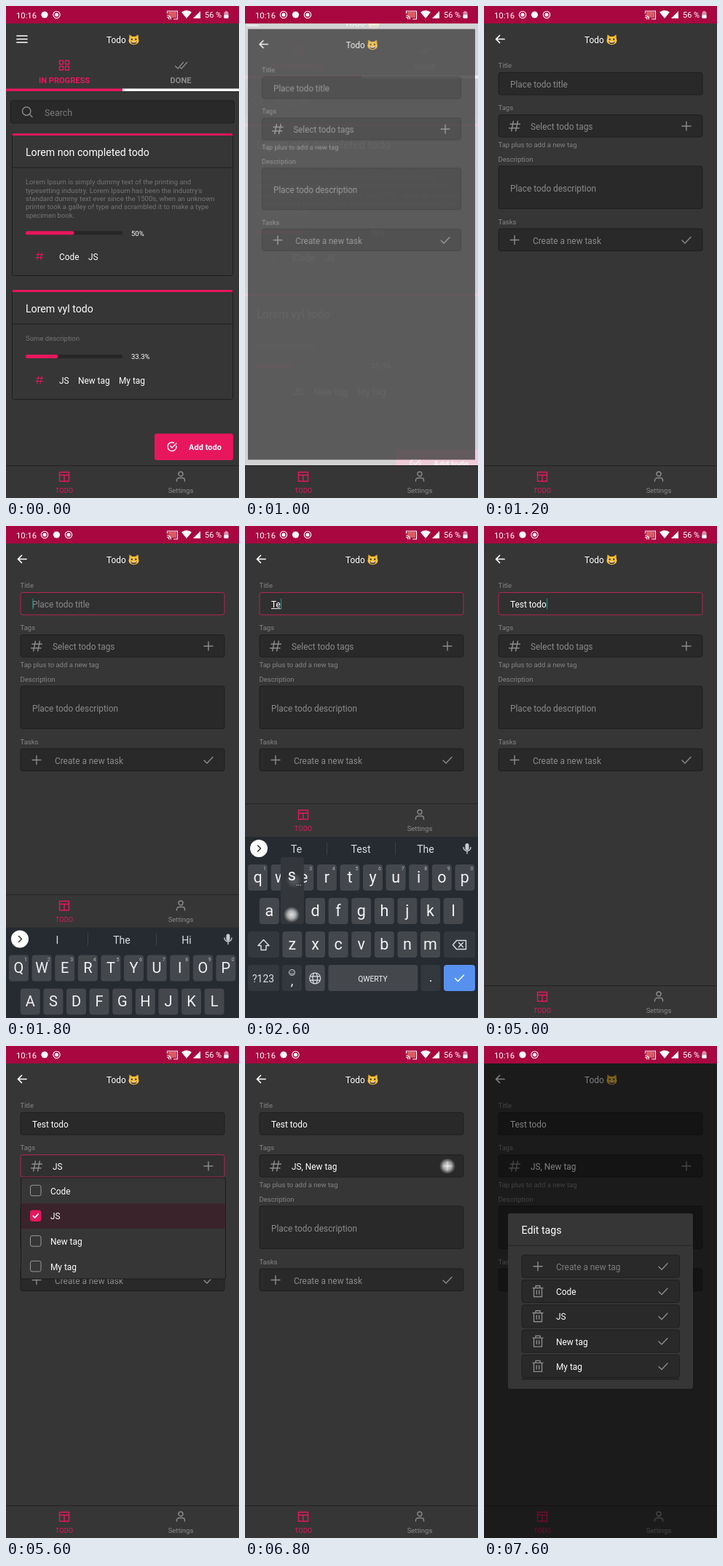
Recreate the animation shown at these times as an HTML page with a canvas. Size 320 by 676 pixels, loop 8 s.

```html
<!DOCTYPE html>
<html lang="en">
<head>
<meta charset="utf-8">
<title>Todo app</title>
<style>
html, body { margin: 0; width: 100%; height: 100%; overflow: hidden; background: #363636; }
canvas { display: block; width: 320px; height: 676px; }
</style>
</head>
<body>
<canvas id="stage"></canvas>
<script>
const W = 320, H = 676, TOP = 24, NAV = 631;
const LOOP = 8000, STEP = 200;
const BG = '#363636', FIELD = '#292929', EDGE = '#1e1e1e', PINK = '#e8175d';
const GREY = '#8b8b8b', DIM = '#757575', WHITE = '#fff';
const KEY = '#44484d', DARK_KEY = '#33383e';
const SMALL = 9.5, BODY = 11.85, LARGE = 14.15;

const ICON = {
  menu: 'M-7-4.5H7M-7 0H7M-7 4.5H7',
  grid: 'M-6.5-6.5h5v5h-5zM1.5-6.5h5v5h-5zM-6.5 1.5h5v5h-5zM1.5 1.5h5v5h-5z',
  checks: 'M-7.5 1l3.5 3.5L3.5-4M-.5 3l1.5 1.5L8.5-4',
  search: 'M-6.5-1a5.7 5.7 0 1 0 11.4 0a5.7 5.7 0 1 0-11.4 0M3.4 3.2l3.6 3.8',
  hash: 'M-1.2-5l-2 10M3.2-5l-2 10M-4.5-2h10M-5.5 2h10',
  done: 'M6-1v1a6 6 0 1 1-3.5-5.5M-2.2-.8l2.2 2.2L6-4.5',
  layout: 'M-6.5-6h13v12.5h-13zM-6.5-2h13M0-2v8.5',
  user: 'M-3-3.5a3 3 0 1 0 6 0a3 3 0 1 0-6 0M-5.5 6.5v-1.5a3 3 0 0 1 3-3h5a3 3 0 0 1 3 3v1.5',
  back: 'M6 0H-5.5M-.5-5l-5 5 5 5',
  plus: 'M-6 0H6M0-6V6',
  check: 'M-6 .5l4 4L6-4',
  trash: 'M-7-4.5h14M-3-4.5v-3h6v3M-5.5-4.5v12h11v-12M-1.7-1v5M1.7-1v5',
  shift: 'M0-7l7.5 8h-4v6h-7v-6h-4z',
  erase: 'M-9 0l5-6h13v12h-13zM-1-3l6 6M5-3l-6 6',
  globe: 'M-7.5 0a7.5 7.5 0 1 0 15 0a7.5 7.5 0 1 0-15 0M-3.3 0a3.3 7.5 0 1 0 6.6 0a3.3 7.5 0 1 0-6.6 0M-7-2.6h14M-7 2.6h14',
  smile: 'M-4 0a4 4 0 1 0 8 0a4 4 0 1 0-8 0M-2 1a2.2 2.2 0 0 0 4 0M-1.4-1.2v.1M1.4-1.2v.1',
  mic: 'M-5-1a5 5 0 0 0 10 0M0 4v3.5',
  next: 'M-2-4l4 4-4 4',
  cast: 'M-7-2.5v-3h14v11h-5M-7 .5a5 5 0 0 1 5 5M-7 3a2.5 2.5 0 0 1 2.5 2.5'
};

const TAGS = ['Code', 'JS', 'New tag', 'My tag'];
const ABOUT = [
  'Lorem Ipsum is simply dummy text of the printing and',
  "typesetting industry. Lorem Ipsum has been the industry's",
  'standard dummy text ever since the 1500s, when an unknown',
  'printer took a galley of type and scrambled it to make a type',
  'specimen book.'
];

// Timelines: [first step, value]
const TYPED = [[0, ''], [12, 'T'], [13, 'Te'], [14, 'Tes'], [15, 'Test'], [16, 'Test '],
  [18, 'Test t'], [19, 'Test to'], [20, 'Test tod'], [21, 'Test todo']];
const HINTS = [[0, 'I The Hi'], [12, 'T The To'], [13, 'Te Test The'], [14, 'Tes Test Tests'],
  [15, 'Test Testing Tests'], [16, 'the of and'], [18, 'to the today'],
  [19, 'to tomorrow today'], [20, 'tod today todo'], [21, 'todo today todos']];
const CHOSEN = [[0, ''], [28, 'JS'], [30, 'JS, New tag']];
const OPEN = [[0, 0], [4, .45], [5, .833], [6, 1]];
const BOARD = [[0, 0], [9, .5], [10, 1], [24, .4], [25, 0]];
const MODAL = [[0, 0], [36, .3], [37, .8], [38, 1]];

// Touches: [step, x, y, strength]
const TOUCHES = [
  [2, 262, 606, 1], [3, 262, 606, .6], [7, 150, 107, 1], [8, 150, 107, .25],
  [11, 144, 488, 1], [12, 80, 486, 1], [13, 64, 534, 1], [13, 67, 487, .2],
  [14, 144, 486, 1], [14, 64, 534, .2], [15, 176, 614, .9],
  [18, 264, 486, 1], [18, 144, 486, .2], [19, 97, 532, 1], [19, 264, 486, .25],
  [20, 270, 486, 1], [20, 97, 532, .25], [21, 270, 486, .25],
  [26, 160, 165, 1], [27, 110, 234, 1], [29, 110, 268, 1],
  [32, 160, 480, 1], [34, 278, 165, 1], [35, 278, 165, .3]
];

const ratio = window.devicePixelRatio || 1;
function makeContext(canvas) {
  canvas.width = W * ratio;
  canvas.height = H * ratio;
  const ctx = canvas.getContext('2d');
  ctx.scale(ratio, ratio);
  return ctx;
}
const main = makeContext(document.getElementById('stage'));
const layer = makeContext(document.createElement('canvas'));
let c = main;

const at = (list, step) => list.filter(e => e[0] <= step).pop()[1];

function box(x, y, w, h, r, fill, edge) {
  c.beginPath();
  c.roundRect(x, y, w, h, r);
  if (fill) { c.fillStyle = fill; c.fill(); }
  if (edge) { c.strokeStyle = edge; c.lineWidth = 1; c.stroke(); }
}

function disc(x, y, r, fill) {
  c.fillStyle = fill;
  c.beginPath();
  c.arc(x, y, r, 0, 7);
  c.fill();
}

// y is the middle of the capitals
function text(s, x, y, size, color = WHITE, align = 'left', weight = 400) {
  c.font = `${weight} ${size}px Roboto, sans-serif`;
  c.textAlign = align;
  c.fillStyle = color;
  c.fillText(s, x, y + size * .356);
}

function icon(name, x, y, color, size = 1, width = 1.4) {
  c.save();
  c.translate(x, y);
  c.scale(size, size);
  c.lineWidth = width / size;
  c.lineCap = c.lineJoin = 'round';
  c.strokeStyle = color;
  c.stroke(new Path2D(ICON[name]));
  c.restore();
}

function shape(d, x, y, color) {
  c.save();
  c.translate(x, y);
  c.fillStyle = color;
  c.fill(new Path2D(d));
  c.restore();
}

function cat(x, y) {
  shape('M-6.5 0L-6-7.2L-2-4.6H2L6-7.2L6.5 0z', x, y, '#f5b52a');
  shape('M-7 1a7 5.8 0 1 0 14 0a7 5.8 0 1 0-14 0', x, y, '#fcc436');
  shape('M-4 2.2h8a4 3.6 0 0 1-8 0z', x, y, '#5a3a35');
  shape('M-2.8 2.4h5.6v1.2h-5.6z', x, y, WHITE);
  disc(x - 2.8, y - .8, 1.2, '#443026');
  disc(x + 2.8, y - .8, 1.2, '#443026');
}

function target(x) {
  disc(x, 12, 2.6, WHITE);
  c.strokeStyle = WHITE;
  c.lineWidth = 1.1;
  c.beginPath();
  c.arc(x, 12, 4.7, 0, 7);
  c.stroke();
}

function statusBar(extra) {
  box(0, 0, W, TOP, 0, '#a8073f');
  text('10:16', 14, 12.5, 11.25);
  if (extra) target(53);
  const x = extra ? 69.5 : 53;
  disc(x, 12, 4.6, WHITE);
  target(x + 16.5);
  box(223, 8, 11, 8, 0, '#dc5a62');
  icon('cast', 228.5, 12.5, WHITE, 1, 1.2);
  shape('M0 5.5L-7-3a11 11 0 0 1 14 0z', 248, 11.5, WHITE);
  shape('M-5 5L5-5V5z', 262, 12, WHITE);
  text('56 %', 273, 12.5, 11);
  box(299.5, 8, 6, 9, 1, '#d98ba6');
  box(301, 7, 3, 1.5, 0, '#d98ba6');
  box(299.5, 12, 6, 5, 1, WHITE);
}

function header(name) {
  box(0, TOP, W, H, 0, BG);
  icon(name, 22, 45.5, WHITE, 1, 1.7);
  text('Todo', 138, 46.5, BODY);
  cat(175.5, 46.5);
}

function navBar(y) {
  box(0, y, W, H - y, 0, BG);
  box(0, y, W, 1.2, 0, '#262626');
  icon('layout', 80, y + 15.5, PINK);
  text('TODO', 80, y + 34.5, 9.2, PINK, 'center');
  icon('user', 240, y + 15.5, GREY);
  text('Settings', 240, y + 34.5, SMALL, GREY, 'center');
}

function card(y, h, title, lines, part, percent, tags) {
  box(8.5, y + .5, 303, h - 1, 3, BG, EDGE);
  box(8.5, y, 303, 3, [3, 3, 0, 0], PINK);
  text(title, 27, y + 25.5, LARGE);
  box(8.5, y + 46.5, 303, 1, 0, EDGE);
  lines.forEach((line, i) => text(line, 27, y + 67 + i * 11.3, SMALL, DIM));
  const b = y + 91.5 + (lines.length - 1) * 11.3;
  box(27, b - 2.5, 133, 5, 2, '#262626');
  box(27, b - 2.5, 133 * part, 5, 2, PINK);
  text(percent, 172, b + .5, SMALL);
  icon('hash', 46, b + 32, PINK, 1, 1);
  for (const [tag, x] of tags) text(tag, x, b + 33, BODY);
}

function listScreen() {
  header('menu');
  icon('grid', 80, 81.5, PINK);
  text('IN PROGRESS', 80, 102.5, 11.06, PINK, 'center', 700);
  icon('checks', 240, 81.5, GREY, 1, 1.3);
  text('DONE', 240, 102.5, 11.06, GREY, 'center', 700);
  box(0, 113.5, 160, 3.5, 0, PINK);
  box(160, 113.5, 160, 3.5, 0, WHITE);
  box(6.5, 130, 307, 31, 3, FIELD, EDGE);
  icon('search', 29, 145.5, GREY);
  text('Search', 53, 146.5, 12.4, '#7c7c7c');
  card(175, 196, 'Lorem non completed todo', ABOUT, .5, '50%', [['Code', 73], ['JS', 113]]);
  card(390, 151, 'Lorem vyl todo', ['Some description'], 1 / 3, '33.3%',
    [['JS', 73], ['New tag', 99], ['My tag', 155]]);
  box(204, 587.5, 108, 36.5, 3, PINK);
  icon('done', 228, 605.5, WHITE);
  text('Add todo', 251, 606.5, 11.06, WHITE, 'left', 700);
}

function field(y, h, focused) {
  box(20, y, 280, h, 3, focused ? '#303030' : FIELD, focused ? '#b3264f' : EDGE);
}

function titleField(step) {
  const typed = at(TYPED, step), focused = step >= 8 && step < 26;
  field(91.5, 30.5, focused);
  if (typed) text(typed, 36, 107.5, BODY);
  else text('Place todo title', 36, 107.5, BODY, GREY);
  if (!focused) return;
  const end = 36 + (typed ? c.measureText(typed).width : 0);
  const word = typed.split(' ').pop();
  if (word && step < 25) {
    const w = c.measureText(word).width;
    box(end - w, 113, w, .9, 0, WHITE);
  }
  box(end + .3, 99.5, 1.2, 15, 0, '#16907f');
}

function formScreen(step) {
  header('back');
  const label = (s, y) => text(s, 19.5, y, SMALL, '#858585');
  label('Title', 82);
  label('Tags', 140);
  label('Tap plus to add a new tag', 190.5);
  label('Description', 211);
  label('Tasks', 297);
  titleField(step);

  const chosen = at(CHOSEN, step);
  field(149.5, 30.5, step >= 26 && step < 33);
  icon('hash', 42, 165, GREY, 1.35);
  text(chosen || 'Select todo tags', 64, 166, BODY, chosen ? WHITE : GREY);
  icon('plus', 278, 165, GREY);

  field(220, 58.5);
  text('Place todo description', 36, 250.5, BODY, GREY);

  field(306, 30.5);
  icon('plus', 42, 321.5, GREY);
  text('Create a new task', 67, 322.5, BODY, GREY);
  icon('check', 278, 321.5, GREY);

  if (step >= 27 && step < 33) dropdown(chosen.split(', '));
}

function dropdown(chosen) {
  box(20.5, 181, 281, 139, 2, BG, '#1a1a1a');
  TAGS.forEach((tag, i) => {
    const y = 198.8 + i * 34.7, on = chosen.includes(tag);
    if (on) box(21, y - 17.3, 280, 34.7, 0, '#3b232c');
    box(33.5, y - 7.5, 14.5, 14.5, 2.5, on ? PINK : null, on ? PINK : '#999');
    if (on) icon('check', 40.7, y - .3, WHITE, .58, 1.7);
    text(tag, 61, y + .7, BODY);
  });
}

function key(x, y, w, fill = KEY) {
  box(x - w / 2, y - 18, w, 36, 4, fill);
}

function keyboard(step, y0) {
  c.save();
  c.translate(0, y0 - 427);
  box(0, 427, W, 249, 0, '#262a31');
  disc(19, 443, 12, WHITE);
  icon('next', 19.5, 443, '#33373c', 1, 1.6);
  at(HINTS, step).split(' ').forEach((s, i) => text(s, [70.5, 159, 248][i], 444, 14.05, '#dcdfe3', 'center'));
  box(112, 435, 1, 17, 0, '#3d4249');
  box(206, 435, 1, 17, 0, '#3d4249');
  box(302.5, 436, 5, 9.5, 2.5, '#c9ccd1');
  icon('mic', 305, 442.5, '#c9ccd1');

  const upper = step < 12;
  const starts = [17.5, 33.3, 64.9];
  ['qwertyuiop', 'asdfghjkl', 'zxcvbnm'].forEach((row, r) => {
    [...row].forEach((ch, i) => {
      const x = starts[r] + i * 31.6, y = 483 + r * 46;
      key(x, y, 27);
      text(upper ? ch.toUpperCase() : ch, x, y - 1, upper ? 20 : 21.5, '#f1f2f3', 'center');
      if (!r) text((i + 1) % 10, x + 9.5, y - 12, 7, '#b5b8bc', 'center');
    });
  });
  key(25.5, 575, 43, DARK_KEY);
  icon('shift', 25.5, 575.5, '#dcdfe3');
  key(294.5, 575, 43, DARK_KEY);
  icon('erase', 294.5, 575.5, '#dcdfe3');
  key(25.5, 621, 43, DARK_KEY);
  text('?123', 25, 622, 13.9, '#dcdfe3', 'center');
  key(64.5, 621, 27, DARK_KEY);
  icon('smile', 64.5, 613.5, '#dcdfe3', 1, 1);
  text(',', 64.5, 625, 18, '#f1f2f3', 'center');
  key(96.2, 621, 27);
  icon('globe', 96.2, 621.5, '#dcdfe3', 1, 1.2);
  key(175.8, 621, 123);
  text('QWERTY', 175.5, 622, 10.3, '#f1f2f3', 'center');
  key(255, 621, 27, DARK_KEY);
  text('.', 255, 620, 18, '#f1f2f3', 'center');
  key(294.5, 621, 43, '#5791f0');
  icon('check', 294.5, 621, WHITE, 1, 1.5);

  if (step === 11) keyPopup('T', 144, 483);
  if (step === 13) keyPopup('s', 64.9, 529);
  c.restore();
}

function keyPopup(ch, x, y) {
  box(x - 16, y - 74, 32, 92, 4, '#33373c');
  text(ch, x - .5, y - 50, 21.5, WHITE, 'center');
  text('...', x + 9, y - 39, 10, WHITE, 'center');
}

function modal(alpha) {
  box(0, TOP, W, H - TOP, 0, `rgba(0,0,0,${.5 * alpha})`);
  c.globalAlpha = alpha;
  box(33, 230, 254, 241, 3, BG);
  text('Edit tags', 51.5, 253, LARGE);
  box(33, 273.5, 254, 1.2, 0, '#262626');
  box(51.5, 456, 217, 3, 2, '#262626');
  ['Create a new tag', ...TAGS].forEach((s, i) => {
    const y = 302.7 + i * 34.3;
    box(52, y - 15.5, 216.5, 31, 3, FIELD, EDGE);
    icon(i ? 'trash' : 'plus', 74, y, GREY);
    text(s, 99, y + .8, BODY, i ? WHITE : '#7c7c7c');
    icon('check', 246, y, GREY);
  });
  c.globalAlpha = 1;
}

function touch(x, y, power) {
  const g = c.createRadialGradient(x, y, 0, x, y, 11);
  g.addColorStop(0, `rgba(255,255,255,${.85 * power})`);
  g.addColorStop(.5, `rgba(225,225,225,${.7 * power})`);
  g.addColorStop(.75, `rgba(200,200,200,${.4 * power})`);
  g.addColorStop(1, 'rgba(200,200,200,0)');
  disc(x, y, 11, g);
}

// Draws a screen as one sheet, scaled about the middle of the content area
function sheet(draw, scale, alpha) {
  c = layer;
  c.clearRect(0, 0, W, H);
  c.save();
  c.beginPath();
  c.rect(0, TOP, W, NAV - TOP);
  c.clip();
  draw();
  c.restore();
  c = main;
  const mid = (TOP + NAV) / 2;
  c.save();
  c.beginPath();
  c.rect(0, TOP, W, NAV - TOP);
  c.clip();
  c.globalAlpha = alpha;
  c.translate(W / 2, mid);
  c.scale(scale, scale);
  c.drawImage(layer.canvas, -W / 2, -mid, W, H);
  c.restore();
}

function render(step) {
  const open = at(OPEN, step), board = at(BOARD, step), shade = at(MODAL, step);
  box(0, 0, W, H, 0, '#f2f2f2');
  if (open === 0) listScreen();
  else if (open === 1) formScreen(step);
  else {
    sheet(listScreen, 1 + .1 * open, 1 - open);
    sheet(() => formScreen(step), .85 + .15 * open, open ** 1.5);
  }
  navBar(NAV - 250 * board);
  if (board) keyboard(step, H - 249 * board);
  if (shade) modal(shade);
  statusBar(step >= 4 && step < 25);
  for (const [s, x, y, power] of TOUCHES) if (s === step) touch(x, y, power);
}

const start = performance.now();
function tick() {
  const t = (performance.now() - start) % LOOP;
  render(Math.floor(t / STEP));
  requestAnimationFrame(tick);
}
tick();
</script>
</body>
</html>
```
